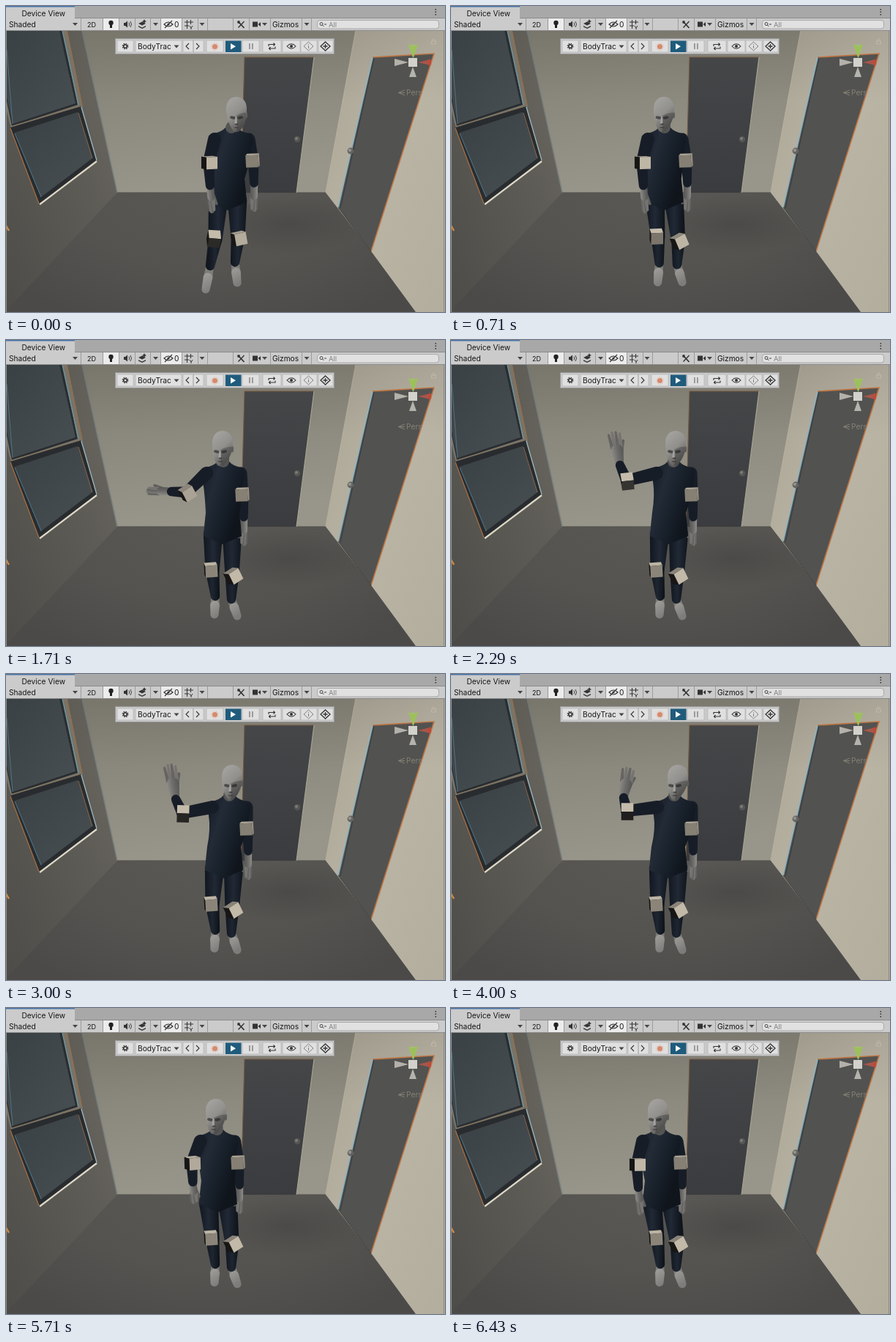
Write an HTML page with a canvas that moves like this. It is 600 px wide and 418 px high and loops after 6570 ms.

```html
<!DOCTYPE html>
<html lang="en">
<head>
<meta charset="utf-8">
<title>Device View</title>
<style>
  html, body { margin: 0; width: 100%; height: 100%; overflow: hidden; background: #4a4a47; }
  svg, canvas { position: absolute; left: 0; top: 0; width: 600px; height: 418px; display: block; }
  text { font-family: Inter, Roboto, sans-serif; font-size: 10.2px; fill: #161616; }
  .line { fill: none; stroke: #333; stroke-width: 1.1; }
  .sep { stroke: #9b9b9b; stroke-width: 1; }
  .btn { fill: #e0e0e0; stroke: #b2b2b2; stroke-width: .7; }
</style>
</head>
<body>
<svg viewBox="0 0 600 418">
  <defs>
    <linearGradient id="back" x1="0" y1="0" x2=".25" y2="1">
      <stop offset="0" stop-color="#827f74"/><stop offset=".5" stop-color="#8c897e"/><stop offset="1" stop-color="#98958a"/>
    </linearGradient>
    <linearGradient id="left" x1="0" y1="1" x2="1" y2="0">
      <stop offset="0" stop-color="#4d4c48"/><stop offset=".6" stop-color="#5e5c56"/><stop offset="1" stop-color="#6e6b63"/>
    </linearGradient>
    <linearGradient id="right" x1="0" y1="0" x2="1" y2="1">
      <stop offset="0" stop-color="#aaa495"/><stop offset=".5" stop-color="#bab4a5"/><stop offset="1" stop-color="#b3ad9e"/>
    </linearGradient>
    <radialGradient id="floor" cx=".47" cy=".5" r=".6">
      <stop offset="0" stop-color="#5a5956"/><stop offset=".6" stop-color="#545350"/><stop offset="1" stop-color="#4b4a48"/>
    </radialGradient>
    <linearGradient id="glass" x1="0" y1="0" x2="1" y2="1">
      <stop offset="0" stop-color="#3a4145"/><stop offset="1" stop-color="#484f52"/>
    </linearGradient>
    <linearGradient id="door" x1="0" y1="0" x2="0" y2="1">
      <stop offset="0" stop-color="#444648"/><stop offset="1" stop-color="#3b3c3f"/>
    </linearGradient>
    <radialGradient id="shade"><stop offset="0" stop-color="#2b2a29" stop-opacity=".25"/><stop offset="1" stop-color="#2b2a29" stop-opacity="0"/></radialGradient>
    <linearGradient id="fall" x1="0" y1="0" x2="0" y2="1">
      <stop offset="0" stop-color="#22221f" stop-opacity=".1"/><stop offset=".25" stop-color="#22221f" stop-opacity="0"/>
    </linearGradient>
  </defs>

  <!-- room -->
  <path d="M0 34H600V418H0z" fill="url(#floor)"/>
  <ellipse cx="385" cy="298" rx="110" ry="40" fill="url(#shade)"/>
  <path d="M104 34H478L437 255H152z" fill="url(#back)"/>
  <path d="M0 34H104L152 255L0 416z" fill="url(#left)"/>
  <path d="M478 34H600V418H560L499 335L437 255z" fill="url(#right)"/>
  <path d="M104 34L152 255" stroke="#77807f" stroke-width="1.5"/>
  <path d="M478 34L437 255" stroke="#b5ae9c" stroke-width="1.5"/>
  <path d="M152 255H437" stroke="#53524d" stroke-width="1.2"/>
  <path d="M0 34H600V418H0z" fill="url(#fall)"/>

  <!-- window -->
  <path d="M0 34H84L105 138L7 168L0 140z" fill="#77746a"/>
  <path d="M1 34H77L98 135L8 164L1 130z" fill="#292d30"/>
  <path d="M1 34H73L95 133L9 161L1 125z" fill="url(#glass)"/>
  <path d="M77 34L99 135" stroke="#6f97a3" stroke-width="1.2"/>
  <path d="M83 34L104 136" stroke="#9a6c43" stroke-width="1.2"/>
  <path d="M1 60L9 161" stroke="#4e7484" stroke-width="1"/>
  <path d="M6 166L102 137L124 212L46 272z" fill="#292c2f"/>
  <path d="M12 173L98 145L118 208L48 261z" fill="url(#glass)"/>
  <path d="M8 164L101 137" stroke="#82705a" stroke-width="1"/>
  <path d="M6 167L45 270" stroke="#a86f42" stroke-width="1.2"/>
  <path d="M12 174L48 261" stroke="#4d7b90" stroke-width="1"/>
  <path d="M99 146L118 208" stroke="#8c6a4c" stroke-width="1"/>
  <path d="M103 138L124 211" stroke="#9ab6bc" stroke-width="1.3"/>
  <path d="M46 271L124 212" stroke="#ded9c8" stroke-width="2.2"/>
  <path d="M0 300L4 307" stroke="#d08a45" stroke-width="2.500"/>

  <!-- doors -->
  <path d="M326 70H421L397 255H321z" fill="url(#door)"/>
  <path d="M321 255L326 70H421" fill="none" stroke="#76583f" stroke-width="1.1"/>
  <path d="M421 70L397 255" stroke="#a7a393" stroke-width="1.2"/>
  <circle cx="398" cy="182" r="4.3" fill="#555554"/><circle cx="397" cy="181" r="2" fill="#7b7a76"/>
  <path d="M501 70L585 65L499 335L454 275z" fill="#525250"/>
  <path d="M501 70L454 275" stroke="#8fb4c0" stroke-width="1.700"/>
  <path d="M503 71L457 276" stroke="#363c40" stroke-width="1.1"/>
  <path d="M501 70L585 65L499 335" fill="none" stroke="#bd7544" stroke-width="1.6"/>
  <path d="M454 275L499 335" stroke="#464542" stroke-width="1.2"/>
  <circle cx="471" cy="198" r="4.4" fill="#636361"/><circle cx="470" cy="197" r="2.2" fill="#92918c"/>

  <!-- axis gizmo -->
  <g>
    <path d="M531 72V82L550 77z" fill="#b3b1aa"/>
    <path d="M580 73V81L563 77z" fill="#a8564a"/><ellipse cx="579" cy="77" rx="2" ry="4.500" fill="#c0483a"/>
    <path d="M550 53H563L556.500 71z" fill="#a9bf78"/><path d="M550 52L556.500 55L563 52L556.500 71z" fill="#9cc05a"/>
    <path d="M551 97H561L556 83z" fill="#b4b3ad"/>
    <path d="M550 71H562V83H550z" fill="#d3d1cb"/>
    <text x="554" y="47" style="fill:#a5ad80;font-size:8px">y</text>
    <path d="M581.500 48H587.500V52H581.500zM583 48V46.500a1.500 1.500 0 0 1 3 0V48" fill="none" stroke="#c8c2b2" opacity=".6"/>
    <path d="M545 115L536 118.500L545 122M538 118.500H545" fill="none" stroke="#858174"/>
    <text x="547" y="122" style="fill:#858174">Pers</text>
  </g>

  <!-- window header -->
  <path d="M0 0H600V17H0z" fill="#a8a8a8"/>
  <path d="M0 0H94V17H0z" fill="#cbcbcb"/><path d="M0 0H94V1.500H0z" fill="#4673a8"/>
  <text x="21.500" y="13.500">Device View</text>
  <path d="M586.500 4h1.600v1.600h-1.600zm0 3.500h1.600v1.600h-1.600zm0 3.500h1.600v1.600h-1.600z" fill="#333"/>
  <path d="M0 16.500H600V33.500H0z" fill="#cbcbcb"/>
  <path d="M0 33.500H600M94 16.500H600" stroke="#8b8b8b"/>
  <path d="M133 17H154V33H133zM212 17H240V33H212z" fill="#ececec"/>
  <path class="sep" d="M102.500 17V33M132.500 17V33M154.500 17V33M176.500 17V33M197.500 17V33M211.500 17V33M240.500 17V33M262.500 17V33M275.500 17V33M310.500 17V33M332.500 17V33M361.500 17V33M404.500 17V33M417.500 17V33"/>
  <path d="M91 23h7l-3.500 4zM201 23h7l-3.500 4zM264.500 23h7l-3.500 4zM350 23h7l-3.500 4zM407.500 23h7l-3.500 4z" fill="#444"/>
  <text x="4" y="29">Shaded</text>
  <text x="111" y="28.500" style="font-size:9px">2D</text>
  <text x="364" y="29">Gizmos</text>
  <text x="230" y="29">0</text>
  <circle cx="143.500" cy="23" r="3.200" fill="#222"/><path d="M142 26h3v4h-3z" fill="#222"/>
  <path d="M161 23h2l3-2.500v9l-3-2.500h-2z" fill="#333"/>
  <path class="line" d="M168 22.500q1.500 2.500 0 5M170 21q3 4 0 8" style="stroke-width:.9"/>
  <path d="M181 24l5-2.500 5 2.500-5 2.500zM181 27l5 2.500 5-2.500v1.500l-5 2.500-5-2.500zM189 18l1 2 2 1-2 1-1 2-1-2-2-1 2-1z" fill="#333"/>
  <path class="line" d="M216 25q6-6 12 0q-6 6-12 0zM217 30L227 20"/><circle cx="222" cy="25" r="1.600" fill="#333"/>
  <path class="line" d="M244 22H256M244 27H250M247.500 19V31M252.500 19V25M251 27l2 3 2-3M253 30v2" style="stroke-width:1"/>
  <path class="line" d="M317.500 21.500L325.500 30" style="stroke-width:1.800"/><path class="line" d="M325.500 21L317.500 29.500" style="stroke-width:1.300"/><circle cx="318" cy="22" r="1.900" fill="#333"/>
  <path d="M337 21.500h7v7h-7zM344.500 25l3.500-3v6z" fill="#333"/>
  <rect x="425.500" y="19.500" width="166" height="11.500" rx="3.500" fill="#e1e1e1" stroke="#a9a9a9"/>
  <circle class="line" cx="431" cy="24.500" r="2" style="stroke-width:.9"/><path class="line" d="M432.500 26l2 2M435 25h3" style="stroke-width:.9"/>
  <text x="441" y="28.500" style="fill:#808080;font-size:9.500px">All</text>

  <!-- session bar -->
  <rect x="149.500" y="44.500" width="299" height="21" fill="#c9c9c9" stroke="#989898"/>
  <path class="btn" d="M152 47H174V63H152zM177 47H240V63H177zM242 47H270V63H242zM274 47H297V63H274zM323 47H346V63H323zM351 47H376V63H351zM378 47H402V63H378zM403 47H425V63H403zM427 47H447V63H427z"/>
  <path d="M300 47.500H321.500V63H300z" fill="#1f5b7c"/><path d="M307 51V59.500L314 55.200z" fill="#fff"/>
  <circle class="line" cx="163" cy="55" r="2.300" style="stroke-width:1.600"/>
  <circle class="line" cx="163" cy="55" r="3.800" style="stroke-width:1.200;stroke-dasharray:1.500"/>
  <text x="180" y="59">BodyTrac</text>
  <path d="M229.500 53.500h7l-3.500 4z" fill="#444"/>
  <path class="line" d="M250 51l-4 4 4 4M260 51l4 4-4 4"/><path class="sep" d="M256 47V63"/>
  <circle cx="285.500" cy="55.500" r="3.600" fill="#d68a6d"/><circle cx="285.500" cy="55.500" r="4.900" fill="none" stroke="#e2b09c" stroke-dasharray="1.500"/>
  <path d="M332 51h1.800v8h-1.800zm4 0h1.800v8h-1.800z" fill="#949494"/>
  <path class="line" d="M359 55v-2.500h8.500M365.500 50.500l2 2-2 2M368 55.500V58h-8.500M361.500 56L359.500 58l2 2"/>
  <path class="line" d="M384 55q6-6.500 12 0q-6 6.500-12 0z"/><circle cx="390" cy="55" r="2" fill="#333"/>
  <path class="line" d="M413.500 49L420 55L413.500 61L407 55zM413.500 54v4M413.500 52v1" style="stroke:#777;stroke-width:.9"/>
  <path class="line" d="M436.500 49L443 55L436.500 61L430 55zM436.500 52v6M433.500 55h6" style="stroke-width:1.300"/>
  <path d="M.5 34V418M598.500 34V418" stroke="#8d8b84"/>
</svg>
<canvas id="stage" width="600" height="418"></canvas>

<script>
const ctx = document.getElementById('stage').getContext('2d');
const LOOP = 6570, STEP = 1000 / 7, RAD = Math.PI / 180;
const SUIT = '#171d27';

const mix = (a, b, k) => a.map((v, i) => v + (b[i] - v) * k);
const ease = k => k * k * (3 - 2 * k);

// body: head x, look, chest x, hip x, right-arm reach; arm: elbow, wrist, fingertip, spread
const pose = (t, body, spin, arm) => {
  const c = body[2];
  return { t, body, spin, arm: arm || [c - 31, 213, c - 29, 245, c - 26, 284, 1.8] };
};
const poses = [
  pose(0, [315, 0, 308, 303, 30], [25, 5, 0]),
  pose(1000, [285, -3, 288, 289, 30], [25, 3, 0]),
  pose(1150, [285, -3, 288, 289, 30], [25, 3, 0]),
  pose(1714, [296, -3, 297, 296, 27], [14, 20, -28], [247, 208, 226, 207, 191, 206, 2.4]),
  pose(2300, [307, -2, 304, 298, 26], [4, 42, -4], [240, 192, 231, 171, 222, 123, 4.4]),
  pose(3000, [309, -2, 305, 298, 25], [0, 42, 2], [241, 190, 232, 171, 223, 121, 4.4]),
  pose(4000, [310, -4, 305, 297, 25], [0, 45, 0], [240, 187, 236, 169, 243, 126, 4.4]),
  pose(5000, [303, -3, 302, 297, 25], [22, 50, -15], [237, 194, 234, 178, 228, 138, 4.4]),
  pose(5900, [285, -3, 287, 289, 30], [25, 5, 0]),
  pose(6430, [283, -4, 285, 288, 30], [25, 3, 0]),
];
// knee, ankle, toe for each leg, at the start and after the step
const legsFrom = [286, 319, 279, 355, 273, 387, 317, 316, 313, 350, 316, 378];
const legsTo = [282, 315, 286, 350, 285, 375, 309, 321, 308, 354, 316, 377];

function taper(x1, y1, r1, x2, y2, r2, color) {
  const a = Math.atan2(y2 - y1, x2 - x1), q = Math.PI / 2;
  ctx.fillStyle = color;
  ctx.beginPath();
  ctx.arc(x1, y1, r1, a + q, a - q);
  ctx.arc(x2, y2, r2, a - q, a + q);
  ctx.fill();
}

function ellipse(x, y, rx, ry, color, turn = 0) {
  ctx.fillStyle = color;
  ctx.beginPath();
  ctx.ellipse(x, y, rx, ry, turn, 0, 7);
  ctx.fill();
}

function blend(x1, y1, x2, y2, ...stops) {
  const g = ctx.createLinearGradient(x1, y1, x2, y2);
  stops.forEach((c, i) => g.addColorStop(i / (stops.length - 1), c));
  return g;
}

function cube(x, y, [yaw, pitch, roll], half = 8.3) {
  const turn = (a, b, d) => {
    const c = Math.cos(d * RAD), s = Math.sin(d * RAD);
    return [a * c + b * s, b * c - a * s];
  };
  const axes = [[1, 0, 0], [0, 1, 0], [0, 0, 1]].map(([a, b, c]) => {
    [a, c] = turn(a, c, yaw);
    [b, c] = turn(b, c, pitch);
    [b, a] = turn(b, a, roll);
    const s = c < 0 ? -half : half;
    return [a * s, b * s, c * s];
  });
  axes.forEach((n, i) => {
    const u = axes[(i + 1) % 3], v = axes[(i + 2) % 3];
    const lit = Math.max(0, (n[0] * .45 - n[1] * .6 + n[2] * .65) / half);
    const k = Math.min(1, .08 + lit * 1.2);
    ctx.fillStyle = `rgb(${188 * k + 8},${179 * k + 8},${162 * k + 8})`;
    ctx.beginPath();
    [[1, 1], [1, -1], [-1, -1], [-1, 1]].forEach(([p, q]) =>
      ctx.lineTo(x + n[0] + p * u[0] + q * v[0], y + n[1] + p * u[1] + q * v[1]));
    ctx.fill();
  });
}

function hand(wx, wy, tx, ty, spread, side) {
  const dx = tx - wx, dy = ty - wy, len = Math.hypot(dx, dy);
  const at = (k, off) => [wx + dx * k - dy / len * off * side, wy + dy * k + dx / len * off * side];
  const wide = spread * 1.4 + 2.4;
  const skin = blend(...at(.4, -wide), ...at(.4, wide), '#8d8c89', '#6c6b69', '#565655');
  taper(...at(.35, wide * .5), 3, ...at(.66, wide + 2), 1.8, '#5f5f5d');
  for (let i = 0; i < 4; i++) {
    const off = (i - 1.5) * spread;
    taper(...at(.5, off * .9), 2.6, ...at(.96 - Math.abs(i - 1.4) * .055, off * 1.15), 1.6, i % 2 ? '#757471' : '#656462');
  }
  taper(wx, wy, 5.2, ...at(.42, 0), wide, skin);
}

function leg(hx, [kx, ky, ax, ay, tx, ty]) {
  const mx = (ax + tx) / 2, my = (ay + ty) / 2;
  taper(ax, ay - 1, 5.2, mx, my, 6.2, '#7d7c7a');
  taper(mx, my, 6.4, tx, ty, 5.6, blend(ax - 6, ay, ax + 9, ty, '#a8a7a3', '#7d7c7a'));
  taper(hx, 266, 13.2, kx, ky, 9.6, blend(hx - 13, 0, hx + 13, 0, '#11171f', '#212936', '#10151c'));
  taper(kx, ky, 9.4, ax, ay, 6.2, blend(kx - 9, 0, kx + 9, 0, '#12171f', '#1e2631', '#0f141a'));
}

function torso(c, h) {
  ctx.fillStyle = blend(c - 30, 180, c + 32, 200, '#151c26', '#232b37', '#18202a', '#10151c');
  ctx.beginPath();
  ctx.moveTo(c - 8, 166);
  ctx.quadraticCurveTo(c - 13, 172, c - 24, 174);
  ctx.quadraticCurveTo(c - 32, 180, c - 28, 193);
  ctx.quadraticCurveTo(c - 25, 212, h - 23, 236);
  ctx.quadraticCurveTo(h - 25, 252, h - 26, 268);
  ctx.lineTo(h, 279);
  ctx.lineTo(h + 26, 268);
  ctx.quadraticCurveTo(h + 25, 252, h + 23, 236);
  ctx.quadraticCurveTo(c + 26, 212, c + 27, 193);
  ctx.quadraticCurveTo(c + 32, 180, c + 24, 174);
  ctx.quadraticCurveTo(c + 13, 172, c + 8, 166);
  ctx.fill();
}

function head(x, look, c) {
  const f = x + look, dark = 'rgba(30,30,32,.6)';
  taper(x + 1, 157, 8, c, 166, 8, '#545453');
  ellipse(x + 13.2, 149, 1.9, 4.5, '#5d5d5c');
  ctx.fillStyle = blend(x - 12, 130, x + 14, 160, '#a3a29f', '#91908d', '#5b5b5a');
  ctx.beginPath();
  ctx.moveTo(x - 14, 140);
  ctx.bezierCurveTo(x - 14, 118.500, x + 14, 118.500, x + 14, 140);
  ctx.bezierCurveTo(x + 14, 154, f + 11, 164, f + 5, 170);
  ctx.quadraticCurveTo(f, 174, f - 4, 171);
  ctx.bezierCurveTo(f - 9, 164, x - 14, 154, x - 14, 140);
  ctx.fill();
  // shaded side of the face
  ctx.fillStyle = 'rgba(45,45,47,.35)';
  ctx.beginPath();
  ctx.moveTo(f, 150);
  ctx.quadraticCurveTo(x + 8, 145, x + 13.500, 146);
  ctx.bezierCurveTo(x + 13, 156, f + 10, 165, f + 4, 171);
  ctx.lineTo(f, 172);
  ctx.quadraticCurveTo(f + 2, 160, f, 150);
  ctx.fill();
  ellipse(f - 5, 152.500, 4, 2, dark, .2);
  ellipse(f + 5, 152.500, 4, 2, dark, -.2);
  taper(f - .5, 152, 1, f - 1, 159.500, 1.7, '#a2a19e');
  ellipse(f, 161.500, 2.4, .9, dark);
  ellipse(f, 166, 3.300, .9, 'rgba(60,50,50,.6)');
}

function draw(t) {
  let i = 0;
  while (i < poses.length - 2 && t >= poses[i + 1].t) i++;
  const a = poses[i], b = poses[i + 1];
  const k = ease(Math.min(1, (t - a.t) / (b.t - a.t)));
  const [hx, look, c, hip, reach] = mix(a.body, b.body, k);
  let [ex, ey, wx, wy, tx, ty, spread] = mix(a.arm, b.arm, k);
  const spin = mix(a.spin, b.spin, k);
  if (t > 2500 && t < 5000) tx += 4 * Math.sin(t / 500 * Math.PI);

  const step = ease(Math.min(1, t / 1000));
  const legs = mix(legsFrom, legsTo, step);
  const rx = c + reach;

  ctx.clearRect(0, 0, 600, 418);
  leg(hip - 13, legs.slice(0, 6));
  leg(hip + 13, legs.slice(6));

  hand(rx + 1, 244, rx + 1, 282, 1.8, 1);
  taper(c + 24, 182, 8.5, rx, 213, 7.4, SUIT);
  taper(rx, 213, 7.4, rx + 1, 242, 5.8, SUIT);

  torso(c, hip);
  head(hx, look, c);

  hand(wx, wy, tx, ty, spread, ty < ey ? 1 : -1);
  taper(c - 23, 182, 9, ex, ey, 7.8, SUIT);
  taper(ex, ey, 7.8, wx, wy, 6.2, SUIT);

  cube(ex + 1, ey + 1, spin);
  cube(rx - 1, 211, [-8, 8, -3]);
  cube(legs[0] - 2, legs[1] - 1, mix([12, 42, 12], [6, 16, -3], step));
  cube(legs[6] + 1.5, legs[7] + 1.5, mix([18, 10, -10], [24, 16, -26], step));
}

function frame(now) {
  const index = Math.floor((now % LOOP + 9) / STEP);
  draw(Math.min(index, 45) * STEP);
  requestAnimationFrame(frame);
}
draw(0);
requestAnimationFrame(frame);
</script>
</body>
</html>
```
